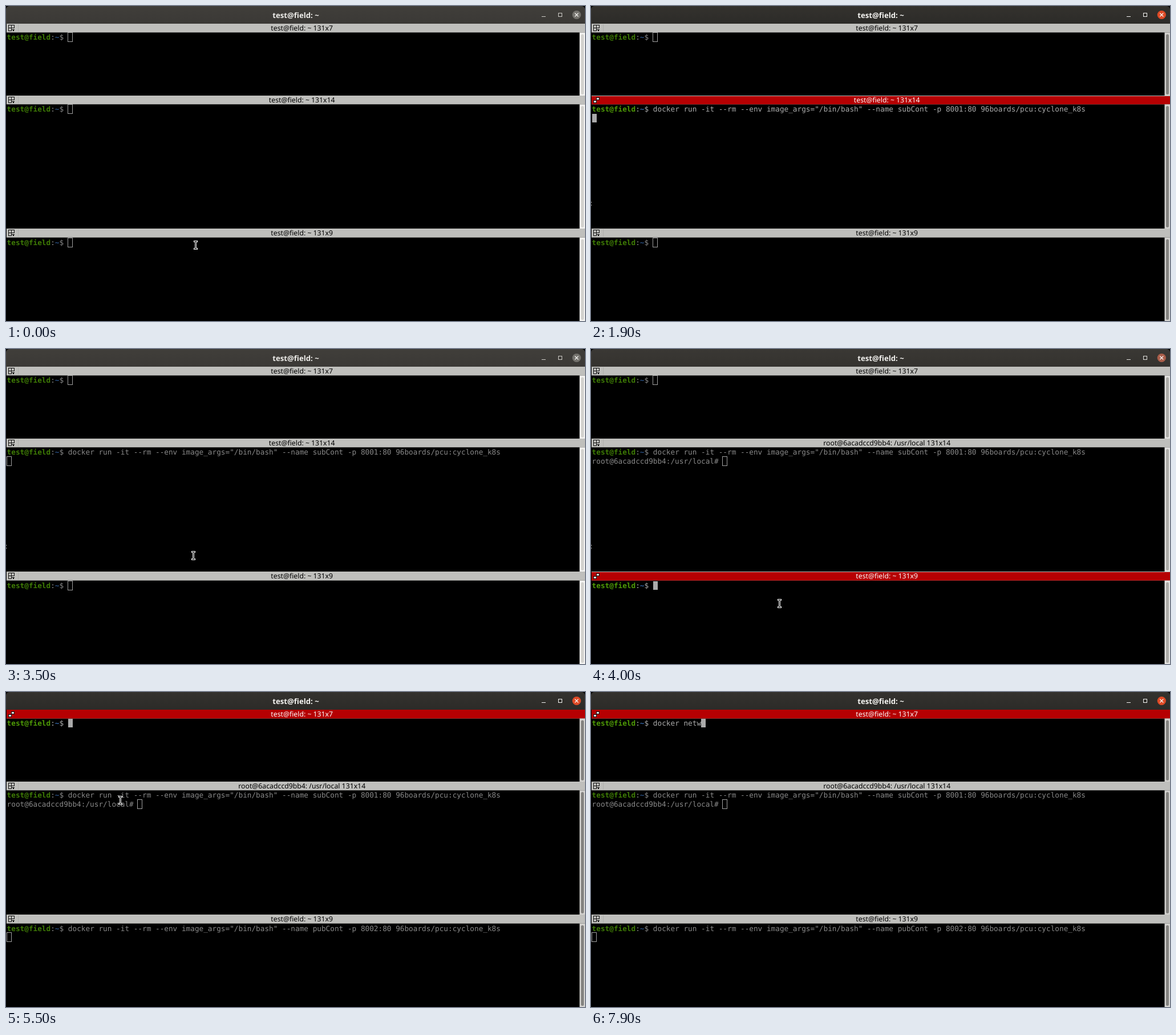
Recreate the animation shown at these times as an HTML page with a canvas. Size 1015x552 px, loop 8000 ms.

```html
<!DOCTYPE html>
<html lang="en">
<head>
<meta charset="utf-8">
<title>Terminal panes</title>
<style>
html, body { margin: 0; width: 100%; height: 100%; overflow: hidden; background: #000; }
canvas { display: block; }
</style>
</head>
<body>
<canvas id="stage" width="1015" height="552"></canvas>
<script>
const ctx = document.getElementById('stage').getContext('2d');
const LOOP = 8000, STEP = 100, W = 1015, H = 552;
const CELL = 7.66, ROW = 15.32, LEFT = 1.6, BAR = 1005.5;
const MONO = '12.72px "DejaVu Sans Mono", monospace';
const SANS = '"Noto Sans", sans-serif';
const HOST = 'test@field', ROOT = 'root@6acadccd9bb4:';
const run = (name, port) =>
  `docker run -it --rm --env image_args="/bin/bash" --name ${name} -p ${port}:80 96boards/pcu:cyclone_k8s`;

// Header top, divider height, content top, content bottom, grid size
const PANES = [
  { head: 31, divider: 0, top: 46.4, bottom: 157, size: '131x7' },
  { head: 157, divider: 1, top: 172.3, bottom: 390, size: '131x14' },
  { head: 390, divider: 1, top: 405.7, bottom: 552, size: '131x9' }
];
// Time, focused pane (-1: window inactive)
const FOCUS = [[0, -1], [600, 1], [2400, -1], [4000, 2], [5200, 0]];
const TYPED = [[6100, 1], [6200, 2], [6500, 3], [6600, 4], [6700, 5], [6800, 6],
  [7200, 7], [7400, 8], [7500, 9], [7600, 10], [7900, 11]];
const POINTER = [
  [[0, 332, 419], [600, 320, 307], [1300, 320, 307], [1600, 200, 350], [1800, 40, 357], [1900, 0, 346]],
  [[3500, 328, 361.5], [3600, 328, 361.5], [3900, 330, 440], [4100, 330, 452], [4400, 330, 452],
    [4900, 324.5, 231], [5100, 320, 96], [5200, 316, 96], [5500, 200, 190], [5900, -10, 434]]
];

const latest = (list, t, first) => list.reduce((v, [at, next]) => t >= at ? next : v, first);
const mix = (a, b, k) => `rgb(${a.map((v, i) => Math.round(v + (b[i] - v) * k))})`;

function box(x, y, w, h, color) {
  ctx.fillStyle = color;
  ctx.fillRect(x, y, w, h);
}

function frame(x, y, w, h, color) {
  ctx.strokeStyle = color;
  ctx.lineWidth = 1;
  ctx.strokeRect(x, y, w, h);
}

function text(str, x, y, font, color, align = 'left') {
  ctx.font = font;
  ctx.fillStyle = color;
  ctx.textAlign = align;
  ctx.fillText(str, x, y);
}

function line(points, color, width) {
  ctx.strokeStyle = color;
  ctx.lineWidth = width;
  ctx.beginPath();
  points.forEach(([x, y], i) => i ? ctx.lineTo(x, y) : ctx.moveTo(x, y));
  ctx.stroke();
}

function pill(x, y, w, h, color) {
  ctx.fillStyle = color;
  ctx.beginPath();
  ctx.roundRect(x, y, w, h, w / 2);
  ctx.fill();
}

// k: 0 inactive window, 1 active window
function titleBar(k) {
  const shade = ctx.createLinearGradient(0, 0, 0, 31);
  shade.addColorStop(0, mix([64, 62, 58], [52, 50, 46], k));
  shade.addColorStop(1, mix([59, 57, 54], [44, 43, 40], k));
  ctx.fillStyle = shade;
  ctx.beginPath();
  ctx.roundRect(0, 0, W, 31, [6, 6, 0, 0]);
  ctx.fill();
  text(HOST + ': ~', 508, 20.5, 'bold 13.2px ' + SANS, mix([238, 237, 234], [246, 245, 242], k), 'center');
  const ink = mix([205, 203, 198], [245, 245, 242], k);
  box(939, 18, 7, 1, ink);
  frame(968.5, 12.5, 6, 6, ink);
  ctx.fillStyle = mix([116, 114, 109], [223, 74, 38], k);
  ctx.beginPath();
  ctx.arc(1000.3, 15.5, 7.6, 0, 7);
  ctx.fill();
  line([[997.3, 12.5], [1003.3, 18.5]], '#f4f3f0', 1.2);
  line([[1003.3, 12.5], [997.3, 18.5]], '#f4f3f0', 1.2);
}

function header(pane, title, active) {
  const y = pane.head;
  box(1, y, W - 1, pane.top - y, '#bfbfbc');
  if (active) {
    box(1, y + pane.divider, W - 1, pane.top - y - pane.divider, '#b60002');
    box(4, y + 8, 6, 5, '#111');
    box(5, y + 9, 4, 3, '#ddd');
    box(9, y + 3, 6, 5, '#111');
    box(10, y + 4, 4, 3, '#ddd');
  } else {
    box(21, y + 1, 1, 13, '#b0b0ad');
    frame(4.5, y + 2.5, 5, 5, '#111');
    frame(9.5, y + 2.5, 5, 5, '#111');
    frame(4.5, y + 7.5, 5, 5, '#111');
    line([[10, y + 10.5], [15, y + 10.5]], '#111', 1);
    box(12, y + 11, 2, 2, '#111');
  }
  text(title, 518.7, y + 12.2, '12.25px ' + SANS, active ? '#fff' : '#000', 'center');
}

function scrollbar(pane, k) {
  const h = pane.bottom - pane.top;
  box(BAR, pane.top, W - BAR, h, mix([244, 243, 241], [212, 211, 208], k));
  pill(1008, pane.top + 3, 5, h - 5, mix([211, 210, 206], [132, 131, 128], k));
}

function prompt(y, active, fg) {
  const col = n => LEFT + n * CELL;
  text(HOST, col(0), y, 'bold ' + MONO, active ? '#4e9a06' : '#3e7b05');
  text(':', col(10), y, MONO, fg);
  text('~', col(11), y, 'bold ' + MONO, active ? '#3465a4' : '#295083');
  text('$', col(12), y, MONO, fg);
}

function content(pane, command, second, active) {
  const fg = active ? '#aaa' : '#888';
  const base = Math.round(pane.top + 13);
  const wrapped = second !== null;
  prompt(base, active, fg);
  text(command, LEFT + 14 * CELL, base, MONO, fg);
  if (wrapped) text(second, LEFT, Math.round(pane.top + 13 + ROW), MONO, fg);
  const x = Math.round(LEFT + CELL * (wrapped ? second.length : 14 + command.length));
  const y = Math.round(pane.top + 1 + (wrapped ? ROW : 0));
  if (active) box(x, y, 8, 15, '#aaa');
  else frame(x - 0.5, y - 0.5, 8, 16, '#a0a0a0');
}

function beam(x, y) {
  x = Math.floor(x) + 0.5;
  y = Math.round(y);
  for (const [color, width, reach] of [['#fff', 3, 3.5], ['#000', 1, 2.5]]) {
    line([[x, y - 6], [x, y + 6]], color, width);
    for (const end of [y - 6.5, y + 6.5]) line([[x - reach, end], [x + reach, end]], color, width);
  }
}

function pointer(t) {
  if (t >= 1900 && t < 5300) {
    box(0, 343, 1, 2, '#999');
    box(0, 348, 1, 2, '#999');
  }
  for (const path of POINTER) {
    const i = path.findIndex(([at]) => at > t);
    if (i < 1) continue;
    const [t0, x0, y0] = path[i - 1], [t1, x1, y1] = path[i];
    const k = (t - t0) / (t1 - t0);
    beam(x0 + (x1 - x0) * k, y0 + (y1 - y0) * k);
  }
}

function glow(t) {
  if (t < 600) return 0;
  if (t < 700) return 0.5;
  if (t < 2400) return 1;
  if (t < 2500) return 0.5;
  if (t < 4000) return 0;
  return t < 4100 ? 0.5 : 1;
}

function draw(t) {
  const focus = latest(FOCUS, t, -1), k = glow(t), ready = t >= 4000;
  const commands = [
    'docker netw'.slice(0, latest(TYPED, t, 0)),
    t >= 900 ? run('subCont', 8001) : '',
    t >= 4300 ? run('pubCont', 8002) : ''
  ];
  const seconds = [
    null,
    ready ? ROOT + '/usr/local# ' : t >= 1300 ? '' : null,
    t >= 4500 ? '' : null
  ];
  box(0, 0, W, H, '#000');
  titleBar(k);
  PANES.forEach((pane, i) => {
    const place = i === 1 && ready ? ROOT + ' /usr/local' : HOST + ': ~';
    content(pane, commands[i], seconds[i], focus === i);
    header(pane, `${place} ${pane.size}`, focus === i);
    scrollbar(pane, k);
  });
  pointer(t);
}

ctx.textRendering = 'geometricPrecision';
const start = performance.now();
function tick() {
  const t = (performance.now() - start) % LOOP;
  draw(Math.floor(t / STEP) * STEP);
  requestAnimationFrame(tick);
}
tick();
</script>
</body>
</html>
```
